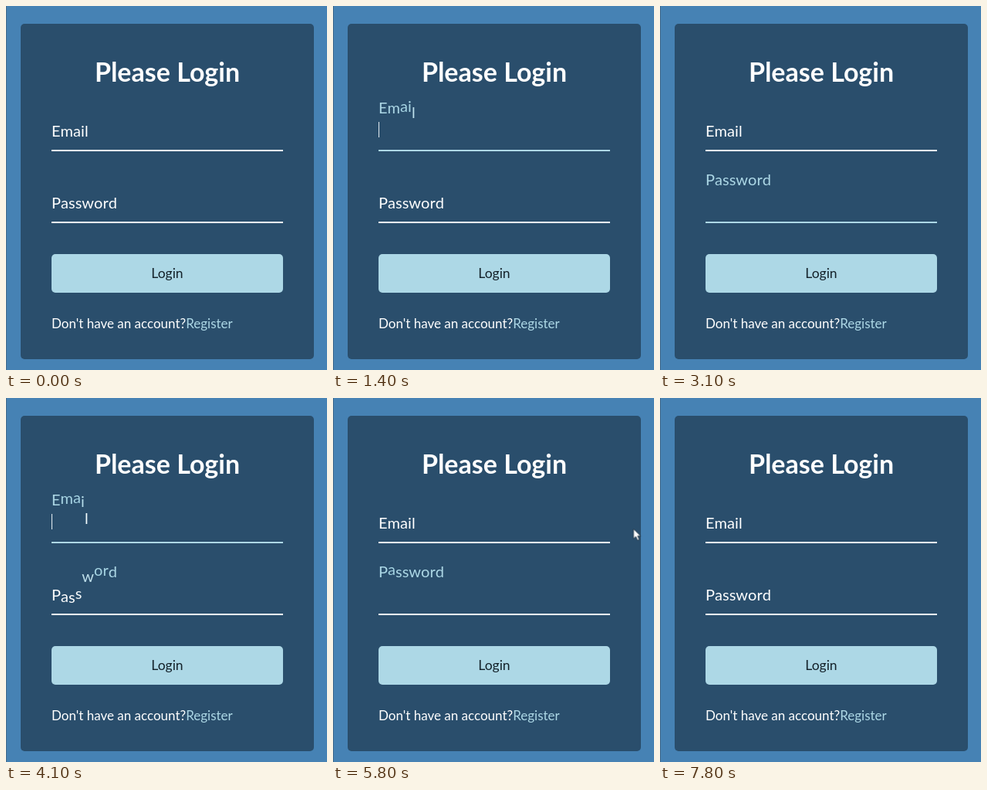
An HTML page that plays this animation: 416x471 px, repeating every 8500 ms.

```html
<!DOCTYPE html>
<html lang="en">
<head>
<meta charset="utf-8">
<title>Login form</title>
<style>
  html, body { margin: 0; width: 100%; height: 100%; overflow: hidden; }
  body { background: steelblue; font-family: Lato, "Open Sans", sans-serif; color: #fff; }
  .stage { position: relative; width: 416px; height: 471px; overflow: hidden; }
  .stage :not(span) { position: absolute; margin: 0; white-space: nowrap; }
  .edge { left: 0; top: 0; width: 1px; height: 471px; background: #41698c; }
  .card { left: 19px; top: 23px; width: 380px; height: 434px; border-radius: 5px; background: #2a4e6c; }

  /* zero line height: text is centred on its top edge */
  h1, label, p, .button b { line-height: 0; }
  h1 { left: 19px; width: 380px; top: 85px; font-size: 34px; text-align: center; }

  .field { left: 59px; width: 300px; height: 48px; }
  .email { top: 140px; }
  .password { top: 233px; }
  label { left: 0; top: 21px; font-size: 20px; }
  label span { display: inline-block; min-width: 5px; }
  .rule { left: 0; top: 46px; width: 300px; height: 2px; background: #fff; }
  .caret { left: 0; top: 10px; width: 1px; height: 20px; background: #e4edf2; visibility: hidden; }

  .button { left: 59px; top: 321px; width: 300px; height: 50px; border-radius: 5px; background: lightblue; }
  .button b { left: 0; width: 300px; top: 24.5px; font-size: 17.5px; font-weight: 400; text-align: center; color: #14222a; }
  p { left: 59px; top: 411px; font-size: 17px; }
  p span { color: lightblue; }
  .stage .mouse { left: 0; top: 0; overflow: visible; }
</style>
</head>
<body>
<div class="stage">
  <div class="edge"></div>
  <div class="card"></div>
  <h1>Please Login</h1>
  <div class="field email"><label>Email</label><i class="caret"></i><i class="rule"></i></div>
  <div class="field password"><label>Password</label><i class="caret"></i><i class="rule"></i></div>
  <div class="button"><b>Login</b></div>
  <p>Don't have an account?<span>Register</span></p>
  <svg class="mouse" width="12" height="18">
    <path d="M0 0V12.5L3 9.8L5.2 14.6L7.4 13.6L5.3 9H9.2Z" fill="#fff" stroke="#1c2f3d" stroke-width=".8"/>
  </svg>
</div>
<script>
  const LOOP = 8500, STEP = 100, MOVE = 300, STAGGER = 50, BLINK = 500;
  const EASE = 'cubic-bezier(0.68, -0.55, 0.265, 1.55)';
  const DOWN = { transform: 'translateY(0)', color: '#ffffff' };
  const UP = { transform: 'translateY(-30px)', color: '#add8e6' };

  // when each field has the focus, in ms
  const focus = {
    email: [[1035, 2330], [3774, 4750]],
    password: [[2330, 3774], [4750, 5700]]
  };

  const clips = [];
  const at = (ms, props, easing = 'linear') => ({ ...props, offset: ms / LOOP, easing });

  function play(el, frames, delay = 0) {
    const clip = el.animate(frames, { duration: LOOP, iterations: Infinity, delay, fill: 'backwards' });
    clip.pause();
    clips.push(clip);
  }

  function wave(el, spans, delay) {
    const frames = [at(0, DOWN)];
    for (const [a, b] of spans)
      frames.push(at(a, DOWN, EASE), at(a + MOVE, UP), at(b, UP, EASE), at(b + MOVE, DOWN));
    play(el, [...frames, at(LOOP, DOWN)], delay);
  }

  function toggle(el, off, on, spans) {
    const hold = (ms, props) => at(ms, props, 'step-end');
    const frames = spans.flatMap(([a, b]) => [hold(a, on), hold(b, off)]);
    play(el, [hold(0, off), ...frames, hold(LOOP, off)]);
  }

  function blinks([a, b]) {
    const spans = [];
    for (let s = a; s < b; s += 2 * BLINK) spans.push([s, Math.min(s + BLINK, b)]);
    return spans;
  }

  for (const [name, spans] of Object.entries(focus)) {
    const field = document.querySelector('.' + name);
    const label = field.querySelector('label');
    const letters = [...label.textContent].map(char => {
      const span = document.createElement('span');
      span.textContent = char;
      return span;
    });
    label.replaceChildren(...letters);
    letters.forEach((span, i) => wave(span, spans, i * STAGGER));
    toggle(field.querySelector('.rule'), { backgroundColor: '#fff' }, { backgroundColor: 'lightblue' }, spans);
    toggle(field.querySelector('.caret'), { visibility: 'hidden' }, { visibility: 'visible' }, spans.flatMap(blinks));
  }

  // the pointer: time, x, y; it is out of view over the fields
  const path = [
    [0, 430, 196], [150, 430, 196], [650, 361, 166], [650, 430, 240],
    [5450, 430, 240], [5450, 361, 236], [5650, 389.5, 169.5],
    [7650, 389.5, 169.5], [7800, 430, 176], [LOOP, 430, 196]
  ];
  play(document.querySelector('.mouse'),
    path.map(([ms, x, y]) => at(ms, { transform: `translate(${x}px, ${y}px)` })));

  // ten pictures a second, with a little slack for late ticks
  const start = performance.now();
  function tick() {
    const time = Math.floor((performance.now() - start + 25) / STEP) * STEP;
    for (const clip of clips) clip.currentTime = time;
    requestAnimationFrame(tick);
  }
  tick();
</script>
</body>
</html>
```
